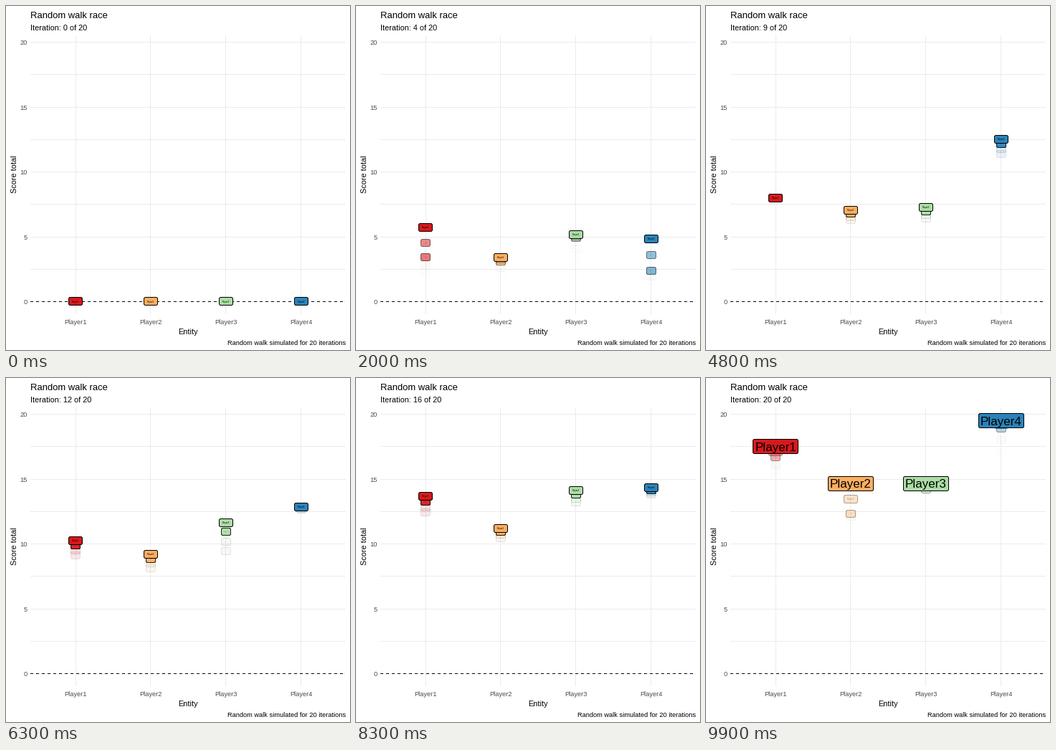
A matplotlib script for the animation above (10000 ms loop, 480 px wide and 480 px high).

```python
import numpy as np
import matplotlib as mpl
import matplotlib.pyplot as plt
from matplotlib.animation import FuncAnimation
from matplotlib.patches import FancyBboxPatch

mpl.rcParams["font.family"] = "Liberation Sans"

SIZE, DPI = 480, 72          # at 72 dpi one point is one pixel
LEFT, RIGHT, TOP, BOTTOM = 34.33, 474.4, 41, 430
ZERO, UNIT = 412.5, 18.1     # pixel row of score 0, pixels per point
LAST, WAKE = 20, 10
GREY, GRID = "#4D4D4D", "#EBEBEB"
SMALL, MEDIUM, LARGE = 9.3, 10.9, 13

COLORS = ["#D7191C", "#FDAE61", "#ABDDA4", "#2B83BA"]
XS = LEFT + (RIGHT - LEFT) * (0.6 + np.arange(4)) / 4.2

# Each walk runs straight between a few key iterations
KEYS = [0, 3, 4, 6.5, 9.5, 12.5, 16.5, 19, 20]
WALKS = [
    [0, 3.4, 5.7, 7.9, 8.0, 10.25, 13.7, 16.7, 17.5],
    [0, 3.1, 3.4, 5.5, 7.05, 9.2, 11.2, 12.3, 14.65],
    [0, 4.9, 5.15, 5.6, 7.25, 11.65, 14.1, 14.2, 14.65],
    [0, 2.35, 4.85, 10.3, 12.5, 12.85, 14.35, 18.9, 19.5],
]


def schedule():
    """Iteration reached in each frame: half step, arrival, then a hold."""
    steps = []
    for k in range(LAST + 1):
        if k:
            steps += [k - 0.5, k]
        steps += [k] * (3 if k < 18 else 2)
    return steps


STEPS = schedule()

fig = plt.figure(figsize=(SIZE / DPI, SIZE / DPI), dpi=DPI, facecolor="white")
ax = fig.add_axes([0, 0, 1, 1])
ax.set_xlim(0, SIZE)
ax.set_ylim(SIZE, 0)
ax.axis("off")


def row(score):
    return ZERO - UNIT * score


def mid_pixel(v):
    return np.floor(v) + 0.5


def write(x, y, s, px, **kw):
    kw = {"va": "baseline", "color": "black", **kw}
    return ax.text(x, y, s, fontsize=px, **kw)


def line(xs, ys, color=GRID, **kw):
    ax.plot(xs, ys, color=color, lw=1, snap=False, solid_capstyle="butt",
            dash_capstyle="butt", **kw)


def draw_chart():
    left, right = int(LEFT), int(RIGHT)
    for v in np.arange(0, 20.1, 2.5):
        line([left, right], [mid_pixel(row(v))] * 2, zorder=1)
    for k, x in enumerate(XS):
        line([mid_pixel(x)] * 2, [TOP, BOTTOM], zorder=1)
        write(x, 444, f"Player{k + 1}", SMALL, ha="center", color=GREY)
    for v in range(0, 21, 5):
        write(29.5, round(row(v) + 3.6), str(v), SMALL, ha="right", color=GREY)
    line([left, right], [ZERO, ZERO], "black", ls=(0, (4, 4)), zorder=2)
    write(left, 17, "Random walk race", LARGE)
    write(254, 458, "Entity", MEDIUM, ha="center")
    write(15, 235, "Score total", MEDIUM, ha="center", rotation=90,
          rotation_mode="anchor")
    write(right, 473, "Random walk simulated for 20 iterations", SMALL,
          ha="right")


draw_chart()
subtitle = write(int(LEFT), 34, "", MEDIUM)
labels = []


def add_label(k, step, fade, z):
    """Name tag of player k; fade shrinks it and makes it transparent."""
    size = (1 + 5 * max(0, step - 19)) * fade
    px = size * 72.27 / 25.4
    px = round(px) if px > 2.5 else 1
    cx, cy = XS[k], row(np.interp(step, KEYS, WALKS[k]))
    w, h = round(10.7 + 3.13 * px), round(10.2 + 0.62 * px)
    x0, y0 = round(cx - w / 2) + 0.5, round(cy - h / 2) + 0.5
    box = FancyBboxPatch(
        (x0, y0), w - 1, h - 1, boxstyle="round,pad=0,rounding_size=2.2",
        fc=COLORS[k], ec="black", lw=1, alpha=fade, snap=False, zorder=z)
    labels.append(ax.add_patch(box))
    labels.append(write(cx, cy + 0.36 * px, f"Player{k + 1}", px, ha="center",
                        alpha=fade, zorder=z))


def update(i):
    while labels:
        labels.pop().remove()
    subtitle.set_text(f"Iteration: {int(STEPS[i])} of {LAST}")
    ages = range(WAKE - 1, 0, -1) if i >= WAKE else ()
    for age in (*ages, 0):
        for k in range(4):
            add_label(k, STEPS[i - age], (1 - age / WAKE) ** 3, 20 - age)
    return [subtitle, *labels]


anim = FuncAnimation(fig, update, frames=len(STEPS), interval=100,
                     init_func=lambda: [], repeat=True, repeat_delay=0)
plt.show()
```
